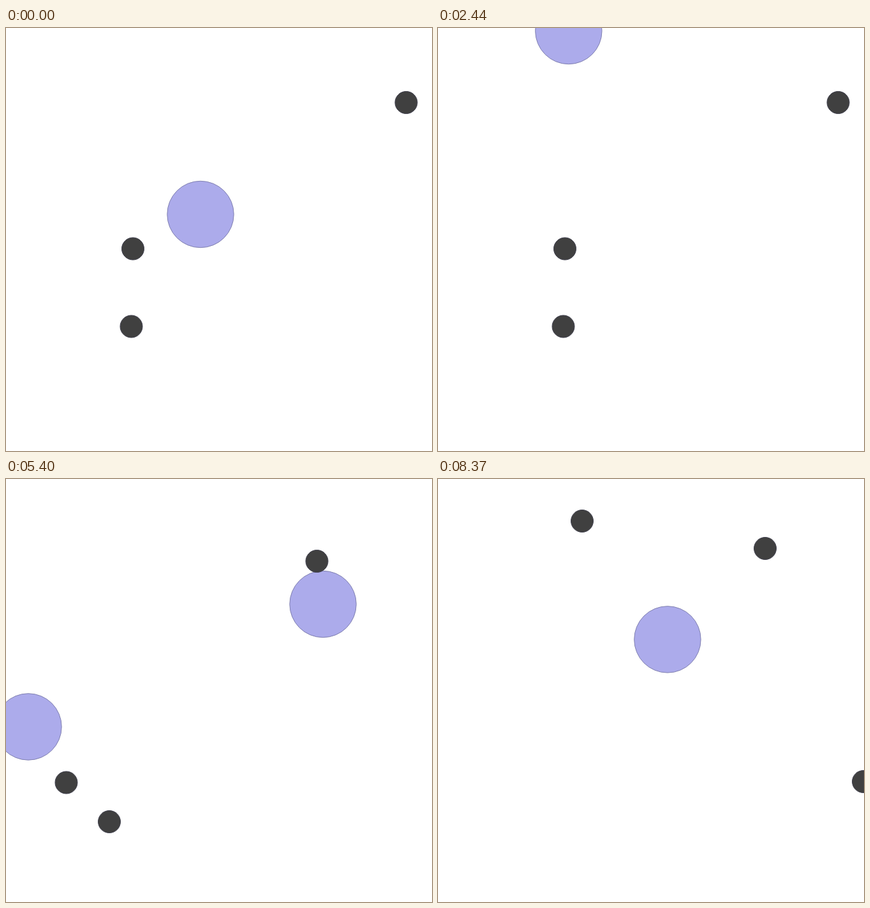
An HTML page with a canvas for the animation above (8.44 s loop, 668 by 664 pixels).

```html
<!DOCTYPE html>
<html lang="en">
<head>
<meta charset="utf-8">
<title>Scattering discs</title>
<style>
  html, body { margin: 0; width: 100%; height: 100%; overflow: hidden; background: #fff; }
  canvas { display: block; }
</style>
</head>
<body>
<canvas id="stage" width="668" height="664"></canvas>
<script>
const ctx = document.getElementById('stage').getContext('2d');
const LOOP = 8440;
const ROUND = 2543;
const STEP = LOOP / 122;

// A disc passes point p at time t (ms into its round) with velocity v (px/s).
// Each kick adds dv to the velocity, spread smoothly around time t by width w.
const disc = (t, p, v, ...kicks) => ({ t, p, v, kicks });
const kick = (t, w, dv) => ({ t, w, dv });

const rounds = [
  {
    dots: [[627.5, 117], [199, 346.5], [196.5, 468.5]],
    discs: [
      disc(0, [305, 292.5], [-270.5, 69], kick(480, 300, [290.5, -238.3])),
      disc(870, [232, 605], [30, -320], kick(870, 150, [0, 720]))
    ]
  },
  {
    dots: [[409.5, 122.5], [316, 130.5], [168.5, 237.5]],
    discs: [
      disc(708, [266.5, 222.5], [35, 15],
        kick(1195, 200, [-180, -110]), kick(1925, 200, [211, -70])),
      disc(0, [444, 575], [30, 60], kick(210, 200, [170, 240])),
      disc(0, [70, 155], [-245, -75])
    ]
  },
  {
    dots: [[487.5, 129], [94.5, 476.5], [162, 538]],
    discs: [
      disc(310, [497, 196.5], [600, -400], kick(370, 200, [-120, -160])),
      disc(310, [35, 389], [-710, -600])
    ]
  },
  {
    dots: [[226, 66], [513, 109], [667, 475]],
    discs: [
      disc(0, [216.5, 158.5], [-390, 15]),
      disc(0, [464.5, 118], [-141, 180.5]),
      disc(0, [527, 438.5], [245, 128], kick(570, 200, [80, 250]))
    ]
  }
];

// Smooth ramp: near 0 before s = 0, near s after it.
const ramp = (s, w) => (s + Math.hypot(s, w)) / 2;

function place(d, t) {
  return d.p.map((start, axis) => d.kicks.reduce(
    (pos, k) => pos + k.dv[axis] * (ramp(t - k.t, k.w) - ramp(d.t - k.t, k.w)) / 1000,
    start + d.v[axis] * (t - d.t) / 1000));
}

function circle([x, y], r, fill, line) {
  ctx.beginPath();
  ctx.arc(x, y, r, 0, Math.PI * 2);
  ctx.fillStyle = fill;
  ctx.fill();
  ctx.strokeStyle = line;
  ctx.stroke();
}

function draw(now) {
  const time = now % LOOP;
  const index = Math.floor(time / ROUND);
  const held = Math.floor(time / STEP + 0.05) * STEP;
  const t = Math.max(0, held - index * ROUND);
  const { dots, discs } = rounds[index];

  ctx.fillStyle = '#fff';
  ctx.fillRect(0, 0, 668, 664);
  for (const d of discs) circle(place(d, t), 52.2, '#acabeb', '#8080b0');
  for (const dot of dots) circle(dot, 17.5, '#404040', '#40404e');
}

function tick(now) {
  draw(now);
  requestAnimationFrame(tick);
}

draw(0);
requestAnimationFrame(tick);
</script>
</body>
</html>
```
